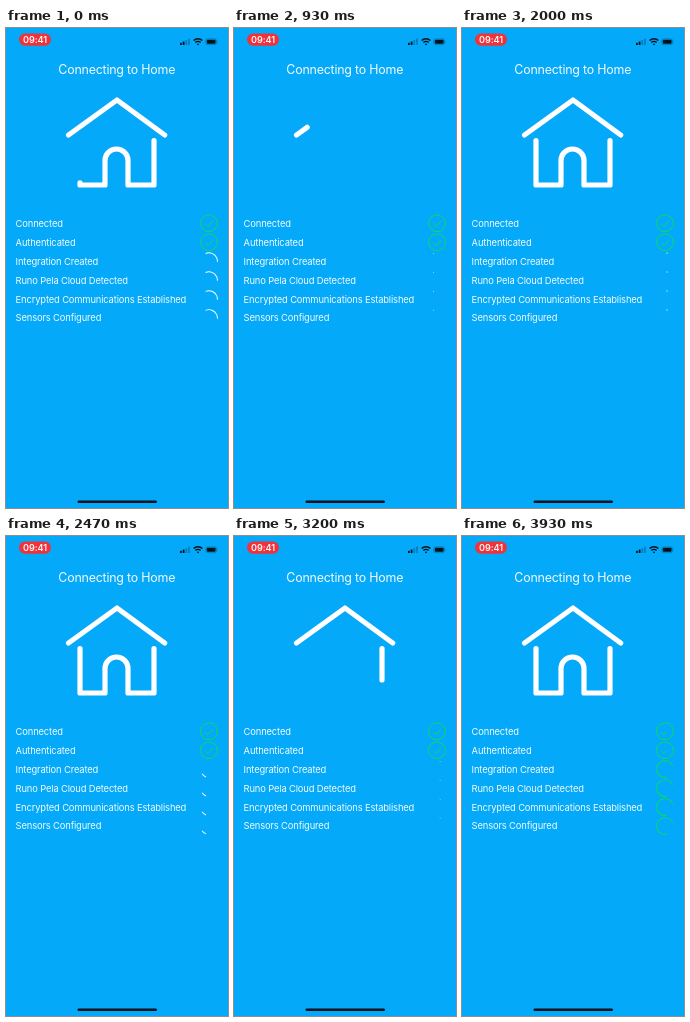
Write an HTML page that moves like this. It is 222x480 px and loops after 3990 ms.

```html
<!DOCTYPE html>
<html lang="en">
<head>
<meta charset="utf-8">
<title>Connecting</title>
<style>
  html, body { margin: 0; width: 100%; height: 100%; overflow: hidden; background: #04a9f9; }
  svg { display: block; width: 100vw; height: 100vh; fill: #04121c; }
  text { font-family: Inter, Roboto, sans-serif; fill: #f4fbff; }
  .title { font-size: 12.4px; letter-spacing: -.19px; text-anchor: middle; }
  .label { font-size: 9.4px; letter-spacing: -.15px; }
  .clock { font-size: 9.1px; font-weight: 600; letter-spacing: -.1px; text-anchor: middle; }
  .line { fill: none; }
  .ink { stroke: #04121c; }
  .house { stroke: #fff; stroke-width: 5.2; stroke-linecap: round; stroke-linejoin: round; }
  .busy { stroke: #fff; stroke-width: .9; }
  .done { stroke: #08de5c; stroke-width: 1; }
</style>
</head>
<body>
<svg viewBox="0 0 222 480">
  <rect width="222" height="480" fill="#04a9f9"/>

  <rect x="13" y="5.5" width="32" height="12.2" rx="6.1" fill="#f23238"/>
  <text class="clock" x="29" y="14.9">09:41</text>
  <g id="bars"></g>
  <path class="line ink" stroke-width="1.4" d="M187.6 12.6a6.2 6.2 0 0 1 8.8 0M189.4 14.5a3.7 3.7 0 0 1 5.2 0"/>
  <path d="M190.8 16a1.7 1.7 0 0 1 2.4 0L192 17.3z"/>
  <rect class="line ink" x="199.9" y="10.9" width="10.6" height="5.8" rx="1.7" stroke-opacity=".45" stroke-width=".6"/>
  <rect x="200.8" y="11.8" width="8.8" height="4" rx="1"/>
  <path d="M211.2 12.8q.9 1 0 2z" opacity=".5"/>

  <text class="title" x="110.8" y="45.6">Connecting to Home</text>

  <g class="line house">
    <path id="roof" d="M62.5 107L111 72L158.7 107"/>
    <path id="walls" d="M148 112.5V157H122V132.5A11.5 11.5 0 0 0 99 132.5V157H74V112.5"/>
  </g>

  <g id="rows"></g>
  <rect x="71.5" y="472.4" width="79.5" height="2.7" rx="1.35"/>
</svg>
<script>
  const LOOP = 3990, STEP = LOOP / 60;
  const DRAW_CYCLE = 1832, DRAW_SPEED = 0.32, DRAW_LEAD = 942;
  const SPIN_CYCLE = 567.5, SPIN_LEAD = 204.5, SPIN_SPEED = 0.338;
  const GREEN_AT = 3730, GREEN_FROM = 170, GREEN_SPEED = 1.325;
  const LABELS = [
    "Connected", "Authenticated", "Integration Created",
    "Runo Pela Cloud Detected", "Encrypted Communications Established", "Sensors Configured"
  ];

  const byId = id => document.getElementById(id);
  function add(parent, tag, attrs) {
    const el = document.createElementNS("http://www.w3.org/2000/svg", tag);
    for (const key in attrs) el.setAttribute(key, attrs[key]);
    return parent.appendChild(el);
  }

  for (let i = 0; i < 4; i++) {
    const h = 2.2 + i * 1.4;
    add(byId("bars"), "rect", { x: 174 + i * 2.7, y: 17 - h, width: 1.8, height: h, rx: .5, opacity: i < 2 ? 1 : .28 });
  }

  const spinners = [], checks = [];
  LABELS.forEach((label, i) => {
    const y = 195.3 + i * 18.95;
    const finished = i < 2;
    add(byId("rows"), "text", { class: "label", x: 9.6, y: y + 3.4 }).textContent = label;
    const icon = add(byId("rows"), "g", { class: finished ? "line done" : "line busy", transform: `translate(203 ${y})` });
    const ring = add(icon, "circle", { r: 8.4, pathLength: 360 });
    if (finished) checks.push(add(icon, "path", { d: "M-3.8 .5L-1 3.3L4 -2.2", pathLength: 1 }));
    else spinners.push({ icon, ring });
  });

  // A hump from 0 to 1 and back over phase 0..1; skew moves its peak.
  const hump = (phase, skew) => Math.sin(Math.PI * phase ** skew) ** 2;

  // Angles run clockwise from the top; the arc grows fast and shrinks slowly.
  function spinnerArc(t) {
    const phase = (t + SPIN_LEAD) % SPIN_CYCLE / SPIN_CYCLE;
    const size = 3 + 125 * hump(phase, .52);
    const middle = 22 + SPIN_SPEED * t + 85 * hump(phase, 2);
    return { from: middle - size / 2, size };
  }

  const successArc = t => ({ from: GREEN_FROM, size: (t - GREEN_AT) * GREEN_SPEED });

  function reveal(path, shown) {
    path.style.visibility = shown > 0 ? "visible" : "hidden";
    path.style.strokeDasharray = `${Math.max(shown, 0)} 1000`;
  }

  const roof = byId("roof"), walls = byId("walls");
  const roofLength = roof.getTotalLength();

  function render(t) {
    const drawn = (t + DRAW_LEAD) % DRAW_CYCLE * DRAW_SPEED;
    reveal(roof, drawn);
    reveal(walls, drawn - roofLength);

    const green = t > GREEN_AT;
    const arc = green ? successArc(t) : spinnerArc(t);
    for (const { icon, ring } of spinners) {
      icon.setAttribute("class", green ? "line done" : "line busy");
      ring.setAttribute("transform", `rotate(${arc.from - 90})`);
      reveal(ring, arc.size);
    }
    for (const check of checks) reveal(check, t > 3900 ? .65 : 1);
  }

  const start = performance.now();
  function tick() {
    const t = (performance.now() - start) % LOOP;
    render(Math.min(59, Math.floor((t + 5) / STEP)) * STEP);
    requestAnimationFrame(tick);
  }
  tick();
</script>
</body>
</html>
```
